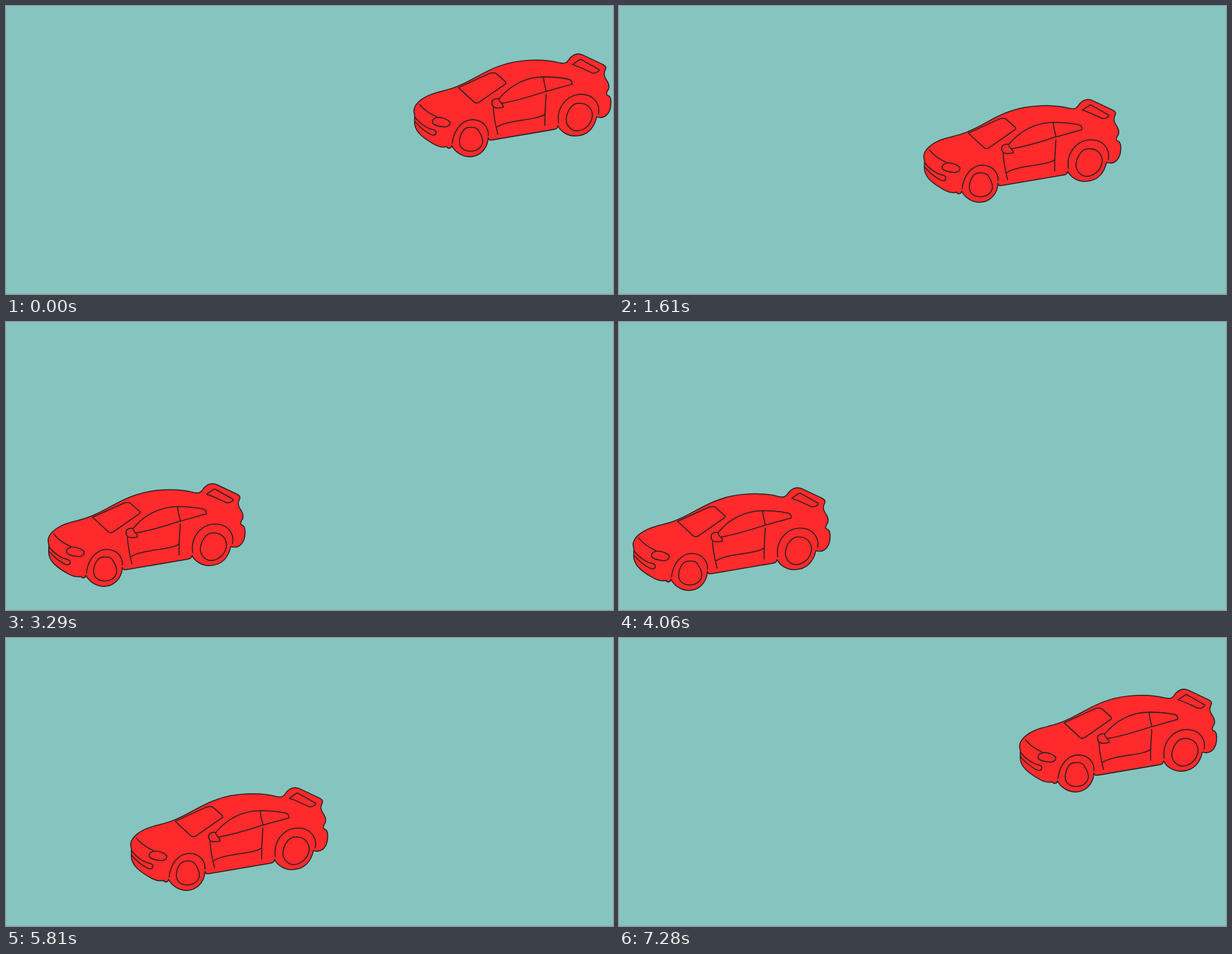
Recreate the animation shown at these times as an HTML page. Size 1080x512 px, loop 7.35 s.

```html
<!DOCTYPE html>
<html lang="en">
<head>
<meta charset="utf-8">
<title>Red car</title>
<style>
  html, body { margin: 0; width: 100%; height: 100%; overflow: hidden; background: #86c4bf; }
  svg { display: block; width: 100%; height: 100%; }
  #car { fill: none; stroke: #2b2222; stroke-width: 1.8; stroke-linecap: round; stroke-linejoin: round; }
  #body { fill: #ff2a2b; }
</style>
</head>
<body>
<svg viewBox="0 0 1080 512">
  <rect y="511" width="1080" height="1" fill="#80b9b4"/>
  <g id="car">
    <path id="body" d="M726 184C728 172 744 160 766 154C780 150 792 148 805 142C832 131 852 115 880 106
      C910 95 955 93 985 101C998 104 999 98 1004 92C1010 86 1018 83.5 1026 87L1062 104
      C1068 107 1068 110 1066 114C1062 122 1066 128 1070 134C1074 141 1074 146 1070 151
      C1067 157 1069 159 1073 160C1078 164 1077 180 1073 188C1068 197 1060 200 1051 197
      C1047 215 1036 231 1012 231C998 231 986 222 982 213C981 218 979 219 972 220L866 238
      C861 239 858 238 858 234C857 255 842 268 825 268C810 268 798 258 793 248
      C793 253 787 255 784 250C778 252 768 250 757 243C738 232 725 220 727 203
      V197C728 193 725 190 726 184Z"/>
    <!-- windscreen, side windows, mirror -->
    <path d="M805 145L858 121Q867 117 872 120L888 134Q891 136 888 139L842 171Q837 174 833 171Z"/>
    <path d="M877 165C897 141 925 126 957 126C975 126 990 128 1000 130C1006 131 1008 135 1007 139
      C985 145 965 151 960 152C930 162 905 169 882 173M956 126C957 135 959 144 961 151"/>
    <path d="M877 165C877 170 882 173 884 176L885 180C878 182 870 182 867 179C863 175 864 168 868 166Q872 164 877 165"/>
    <!-- door -->
    <path d="M867 181C868 200 872 215 875 228M961 157C960 175 958 195 959 212
      M874 215C890 204 930 203 945 198Q955 196 959 192"/>
    <!-- spoiler -->
    <path d="M1008 104L1020 96Q1022 94 1025 96L1055 113Q1056 115 1051 118Q1047 120 1043 119C1030 113 1018 107 1008 104Z"/>
    <!-- rear and front wheels -->
    <path d="M983 208C979 178 1000 157 1024 157C1045 157 1058 174 1054 192"/>
    <path d="M1017 173C1035 171 1045 184 1043 198C1040 213 1027 222 1015 222C1002 221 995 208 997 198C999 186 1007 174 1017 173Z"/>
    <path d="M794 244C797 219 812 202 831 202C850 203 859 217 858 230"/>
    <path d="M822 216C830 215 838 215 841 222C846 229 850 239 847 246C843 256 832 259 824 258C811 257 806 248 807 239C808 228 814 217 822 216Z"/>
    <!-- headlight, bonnet, bumper -->
    <path d="M759 208C757 203 762 198 770 198C778 198 786 202 790 206C791 212 786 215 780 215C772 214 762 213 759 208Z"/>
    <path d="M736 175C743 184 755 192 766 197"/>
    <path d="M727 197C735 208 748 217 757 219C764 221 766 222 765 226C764 231 759 230 755 228C745 223 735 214 728 206"/>
  </g>
</svg>
<script>
const STEP = 70, STEPS = 105, TURN = 60.5;
const NEAR = { x: -364, y: 160.5 }, FAR = { x: -338, y: 49 };
const car = document.getElementById('car');
const clamp = v => Math.min(1, Math.max(0, v));

// Cubic ease in and out around a centre, with its own width on each side.
function swing(d, before, after) {
  return d < 0 ? 0.5 * clamp(1 + d / before) ** 3 : 1 - 0.5 * clamp(1 - d / after) ** 3;
}

// cubic-bezier(.25, .1, .25, 1)
function ease(x) {
  const curve = (t, a, b) => 3 * (1 - t) ** 2 * t * a + 3 * (1 - t) * t * t * b + t ** 3;
  let lo = 0, hi = 1;
  for (let i = 0; i < 24; i++) {
    const mid = (lo + hi) / 2;
    if (curve(mid, 0.25, 0.25) < x) lo = mid; else hi = mid;
  }
  return curve(lo, 0.1, 1);
}

function place(k) {
  const near = k < TURN ? swing(k - 22.975, 8, 8.6) : swing(98.21 - k, 9.9, 8.6);
  const far = ease(clamp(1 - Math.abs(k - TURN) / 30.1));
  const x = NEAR.x * near + FAR.x * far;
  const y = NEAR.y * near + FAR.y * far;
  car.setAttribute('transform', `translate(${x.toFixed(2)} ${y.toFixed(2)})`);
}

const start = performance.now();
function draw() {
  const elapsed = Math.max(0, performance.now() - start);
  place(Math.floor(elapsed / STEP) % STEPS);
  requestAnimationFrame(draw);
}
draw();
</script>
</body>
</html>
```
